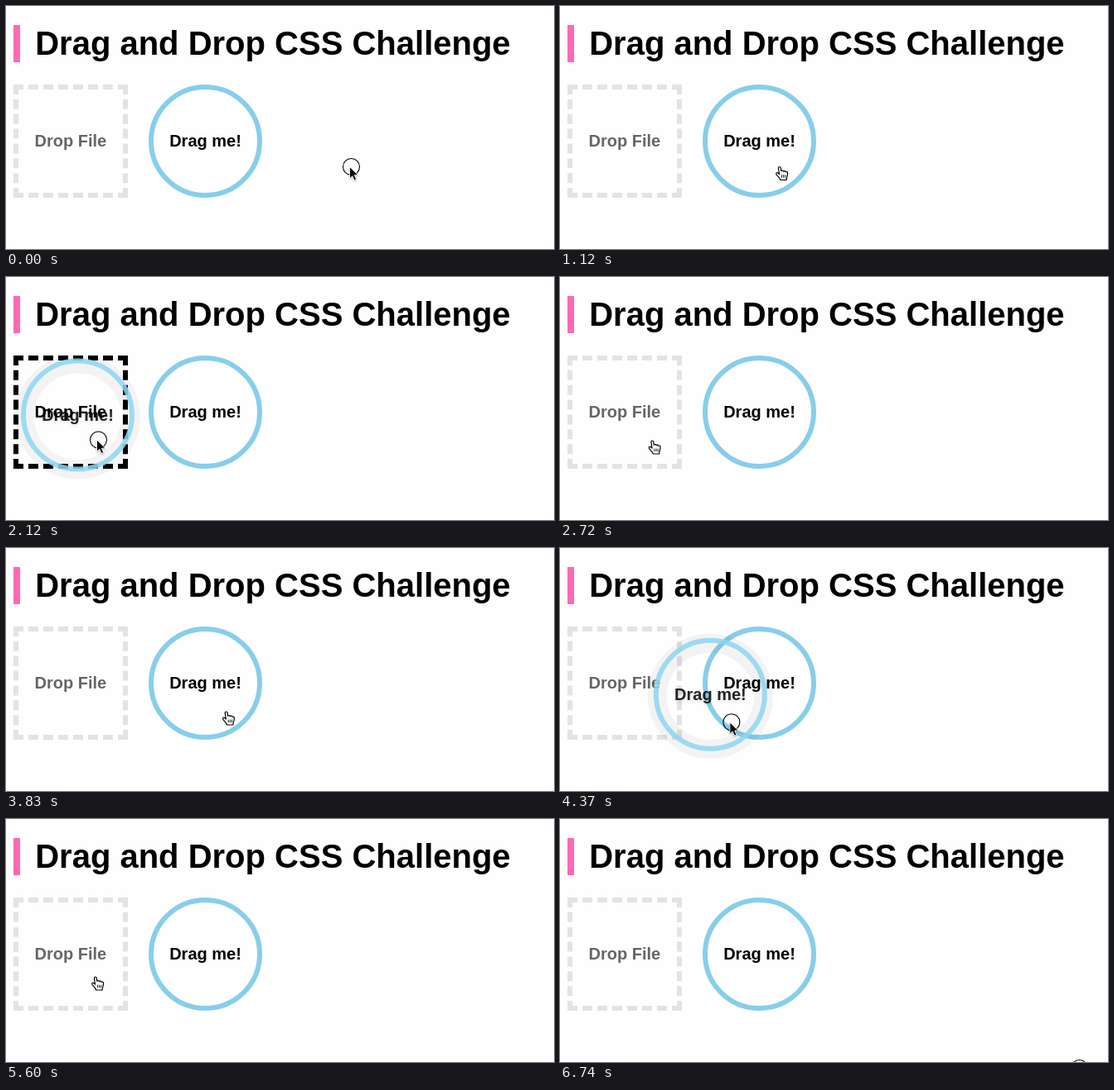
Recreate the animation shown at these times as an HTML page. Size 661 by 294 pixels, loop 6800 ms.

```html
<!DOCTYPE html>
<html lang="en">
<head>
<meta charset="utf-8">
<title>Drag and Drop</title>
<style>
  html, body { margin: 0; width: 100%; height: 100%; overflow: hidden; background: #fefefe; }
  svg { display: block; width: 661px; height: 294px; }
  text { font: bold 20px "Liberation Sans", Arial, sans-serif; }
  .title { font-size: 40px; }
  .label { text-anchor: middle; }
  .ring { fill: none; stroke: #87ceeb; stroke-width: 6; }
  .zone path { fill: none; stroke: #e3e3e3; stroke-width: 6; stroke-dasharray: 12 6; }
  .zone text { fill: #666; }
  .zone.over path { stroke: #000; }
  .zone.over text { fill: #000; }
  .glow { fill: none; stroke: #000; stroke-opacity: .045; stroke-width: 23; }
  .copy { opacity: .86; }
  .copy .ring { stroke: #90d6f1; }
  .copy text { filter: drop-shadow(0 2px 2px rgba(0, 0, 0, .15)); }
  #press { fill: none; stroke: #000; stroke-width: 1.1; }
  #arrow { fill: #000; stroke: #fff; stroke-width: .9; filter: drop-shadow(0 1px 1px rgba(0, 0, 0, .3)); }
  #hand { fill: #fff; stroke: #000; stroke-width: 1.2; stroke-linejoin: round; }
</style>
</head>
<body>
<svg viewBox="0 0 661 294">
  <rect x="9" y="23" width="8" height="45" fill="#ff69b4"/>
  <text class="title" x="35.2" y="59.3">Drag and Drop CSS Challenge</text>

  <g class="zone" id="zone">
    <path pathLength="138" d="M9 98H147"/>
    <path pathLength="138" d="M9 229H147"/>
    <path pathLength="138" d="M12 95V232"/>
    <path pathLength="138" d="M144 95V232"/>
    <text class="label" x="77.8" y="170">Drop File</text>
  </g>

  <g transform="translate(240.5 163.5)">
    <circle class="ring" r="65.5"/>
    <text class="label" y="6.5">Drag me!</text>
  </g>

  <g id="ghost">
    <circle class="glow" cy="2" r="64"/>
    <g class="copy">
      <circle class="ring" r="65.5"/>
      <text class="label" y="6.5">Drag me!</text>
    </g>
  </g>

  <g id="cursor">
    <circle id="press" cx="2" r="10"/>
    <path id="arrow" d="M0 0V14.2L3.3 11.2 5.6 16.5 8.1 15.4 5.9 10.2H10.3Z"/>
    <g id="hand" transform="translate(-3.2 .2)">
      <path d="M3.6 2.2C3.6.3 6.2.3 6.5 2.2L7 6C8 5 9.5 5.3 9.8 6.4 10.8 5.5 12 6 12.3 7 13.6 6.5 14.8 7.2 14.8 8.6 14.8 12 13.3 13 13.3 16.8H6C5.4 14 2.5 12.2 1 9.8.4 8 2.3 7.5 3.3 8.6L4.7 9.8Z"/>
      <path stroke-width=".9" d="M7.6 10.5V14M9.7 10.5V14M11.8 10.5V14"/>
    </g>
  </g>
</svg>
<script>
  const LOOP = 6800, TICK = 60;
  const HOME = { x: 240.5, y: 163.5, r: 68.5 };
  const ZONE_EDGE = 146;
  const START = [414.5, 194.5];
  const $ = id => document.getElementById(id);
  const [zone, ghost, cursor, press, arrow, hand] =
    ['zone', 'ghost', 'cursor', 'press', 'arrow', 'hand'].map($);

  // Each move bends from the previous end, past `via`, to `end`
  const moves = [
    { from: 480, to: 1120, via: [340, 176], end: [263, 193.5] },
    { from: 1350, to: 2000, via: [188.6, 236.6], end: [109.5, 197] },
    { from: 3430, to: 3830, via: [220, 225], end: [263.8, 197] },
    { from: 4130, to: 4890, via: [194, 228], end: [106, 190] },
    { from: 5900, to: 6440, via: [300, 225], end: [600, 306] },
    { from: 6740, to: 6740, via: START, end: [624.5, 301.5] }
  ];
  const drags = [
    { from: 1350, to: 2720, dx: -23, dy: -30 },
    { from: 4130, to: 5600, dx: -23.5, dy: -33.5 }
  ];

  const easeOut = u => 1 - (1 - u) ** 1.5;
  const bend = (a, b, c, s) => (1 - s) ** 2 * a + 2 * s * (1 - s) * b + s * s * c;
  const within = (t, a, b) => t >= a && t < b;

  function pointer(t) {
    const i = moves.findLastIndex(m => t >= m.from);
    if (i < 0) return { x: START[0], y: START[1], still: true };
    const { from, to, via, end } = moves[i];
    if (t >= to) return { x: end[0], y: end[1], still: true };
    const begin = i ? moves[i - 1].end : START;
    const tick = Math.max(from, to - Math.ceil((to - t) / TICK) * TICK);
    const s = easeOut((tick - from) / (to - from));
    const [x, y] = begin.map((a, k) => bend(a, via[k], end[k], s));
    return { x, y, still: false };
  }

  const show = (el, on) => el.setAttribute('visibility', on ? 'visible' : 'hidden');
  const place = (el, x, y) => el.setAttribute('transform', `translate(${x.toFixed(2)} ${y.toFixed(2)})`);

  function draw(t) {
    const p = pointer(t);
    const drag = drags.find(d => within(t, d.from, d.to));
    const inZone = p.x < ZONE_EDGE;
    const onCircle = Math.hypot(p.x - HOME.x, p.y - HOME.y) < HOME.r;
    const pointing = !drag && (onCircle || inZone && p.still);

    place(cursor, p.x, p.y);
    show(hand, pointing);
    show(arrow, !pointing);
    show(press, drag || t < 180 || t >= 6740);
    press.setAttribute('opacity', within(t, 60, 180) ? .5 : 1);

    show(ghost, drag);
    if (drag) place(ghost, p.x + drag.dx, p.y + drag.dy);
    zone.classList.toggle('over', Boolean(drag && inZone));
  }

  const start = performance.now();
  function frame() {
    draw((performance.now() - start) % LOOP);
    requestAnimationFrame(frame);
  }
  frame();
</script>
</body>
</html>
```
